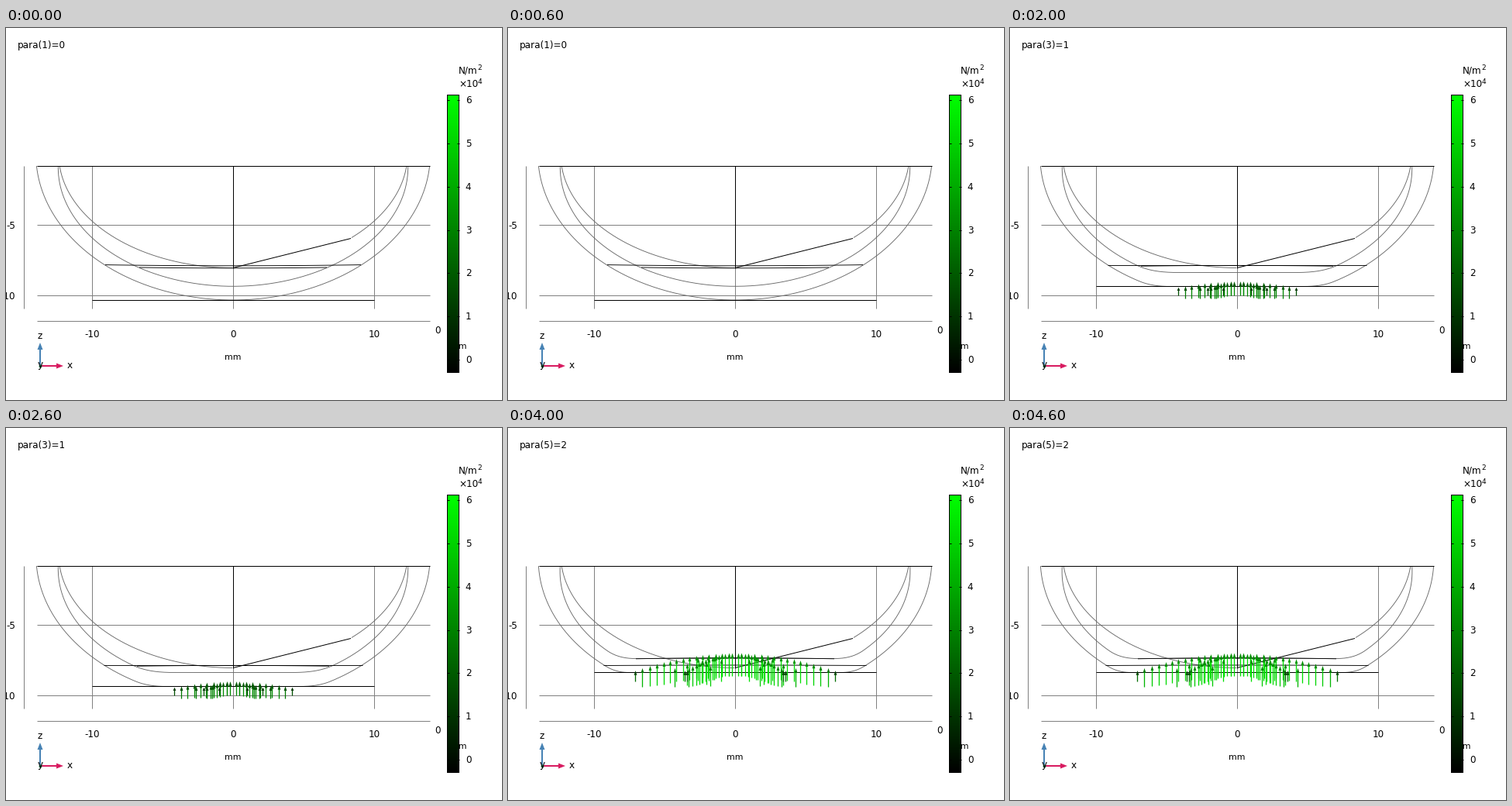
A matplotlib script that plays this animation: 640 by 480 pixels, repeating every 5 s.

```python
import numpy as np
import matplotlib.pyplot as plt
from matplotlib.animation import FuncAnimation
from matplotlib.collections import LineCollection, PolyCollection

W, H, DPI = 640, 480, 100
PX = 72 / DPI
CX, TOP = 293, 178
GREY, DARK = "#808080", "#686868"

plt.rcParams["font.family"] = "DejaVu Sans"
fig = plt.figure(figsize=(W / DPI, H / DPI), dpi=DPI, facecolor="white")
ax = fig.add_axes([0, 0, 1, 1])


def line(xs, ys, color=GREY, width=1, z=2):
    return ax.plot(xs, ys, color=color, lw=width * PX, zorder=z,
                   solid_capstyle="butt")[0]


def label(x, y, s, size=12, ha="center", z=6):
    return ax.text(x, y, s, fontsize=size * PX, ha=ha, va="baseline",
                   color="black", zorder=z)


# One value per load step
STEPS = [0, 0.5, 1, 1.5, 2]
PLATE = [351, 342, 333, 324, 315]
OUTER_FLAT = [0, 48, 85, 110, 133]
INNER_LEVEL = [333, 324, 315.5, 306.5, 297.5]
INNER_FLAT = [0, 48, 75, 105, 125]
BULGE = [0, 0.004, 0.011, 0.02, 0.034]
UPPER = [(165, 305.6, 306.8), (165.5, 306, 306.8), (167, 306.4, 306.4),
         (168, 306.5, 306.5), (169.5, 306.5, 306)]
LOWER = [(121, 309, 309.8), (122, 308.8, 309), (124, 307.2, 306.4),
         (125, 304.7, 302.2), (128, 297.8, 296.6)]
# contact radius, centre tip height, tip drop at the rim, centre length
ARROWS = [None, (46, 344.5, 3, 16), (77, 327, 8, 18),
          (110.5, 308, 15, 20), (130.5, 290.5, 23, 29)]


def shell(a, b, cy, level, flat, bulge):
    """Lower part of an ellipse pressed smoothly against a level."""
    s0 = (TOP - cy) / b
    t0 = np.arcsin(s0)
    t = np.linspace(t0, np.pi - t0, 400)
    x = a * np.cos(t) * (1 + bulge * (np.sin(t) - s0))
    y = cy + b * np.sin(t)
    if flat:
        k = cy + b * np.sqrt(1 - (flat / a) ** 2) - level
        h = np.clip(k - abs(y - level), 0, None)
        y = np.minimum(y, level) - h ** 2 / (4 * k)
    return CX + x, y


def bow(half, end, mid):
    u = np.linspace(-1, 1, 60)
    return CX + half * u, mid + (end - mid) * u ** 2


def arrow_field(spec):
    """Pressure arrows on concentric rings, seen from the side."""
    shafts, heads, colors = [], [], []
    if spec is None:
        return shafts, heads, colors
    rng = np.random.default_rng(4)
    c, tip0, drop, size = spec
    for n in range(1, 17):
        r = 8.4 * n + 1.1 * max(n - 12, 0)
        if r >= c:
            break
        q = (r / c) ** 2
        length = size * (1 + 0.35 * q) * (1 - q) ** 0.25
        tip = tip0 + drop * q
        green = min(0.9, 0.03 * length)
        spread = [1, 0.5] + ([rng.uniform(0.2, 0.72)] if n > 5 else [])
        for x in [CX + s * f * r for f in spread for s in (-1, 1)]:
            hw, hl = 1.9, min(6, 0.4 * length)
            shafts.append([(x, tip + hl / 2), (x, tip + length)])
            x = np.floor(x + 0.5) + 0.5
            heads.append([(x, tip), (x - hw, tip + hl), (x + hw, tip + hl)])
            colors.append((0, green, 0))
    return shafts, heads, colors


# Grid and frame
for y in (254, 345):
    line([39.5, 546.5], [y, y])
for x in (111, CX, 475):
    line([x, x], [TOP, 362])
line([23, 23], [TOP, 362])
line([39.5, 546.5], [378, 378])

# Fixed body edges
line([39.5, 546.5], [TOP, TOP], "black", 1, 4)
line([CX, CX], [TOP, 309.5], "black", 1, 4)
t0 = np.arcsin(15 / 146.5)
ts = np.linspace(t0, np.pi - t0, 400)
ix, iy = CX + 225 * np.cos(ts), 163 + 146.5 * np.sin(ts)
for part in (ix <= CX, ix >= 445):
    line(ix[part], iy[part], DARK, 0.9)
line([CX, 445], [309.5, 271.5], "black", 1, 4)

# Axis labels
label(12, 259, "-5", ha="right")
label(12, 350, "-10", ha="right")
for x, s in ((111, "-10"), (CX, "0"), (475, "10")):
    label(x, 399, s)
label(557, 394, "0")
label(CX, 428, "mm", 11)
label(584, 414, "mm", 11, z=1)

# Colour bar
ramp = np.zeros((256, 1, 3))
ramp[:, 0, 1] = np.linspace(1, 0, 256)
ax.imshow(ramp, extent=(569, 585, 445, 86), aspect="auto", zorder=5)
line([569, 584, 584, 569, 569], [86, 86, 444, 444, 86], "black", 1, 6)
for v in range(7):
    y = 428 - 55.8 * v
    line([569, 572], [y, y], "black", 1, 6)
    line([582, 585], [y, y], "black", 1, 6)
    label(596.5, y + 4, str(v))
label(584, 59, "N/m", ha="left")
label(608.7, 54, "2", 9, "left")
label(584, 76, "×10", ha="left")
label(608.9, 72, "4", 9, "left")

# Axis triad
BLUE, PINK = "#4682b4", "#d81b60"
line([44, 44], [436, 414], BLUE, 2, 4)
line([44, 66], [436, 436], PINK, 2, 4)
ax.fill([44, 40.5, 47.5], [406, 415, 415], color=BLUE, lw=0, zorder=4)
ax.fill([74, 65, 65], [436, 432.5, 439.5], color=PINK, lw=0, zorder=4)
ax.plot([44], [436], "o", ms=4 * PX, mec="#2e8b57", mfc="#2e8b57",
        mew=0, zorder=5)
label(44, 438, "y")
label(82.5, 439, "x")
label(44, 401, "z")

# Moving parts
title = label(15, 26, "", ha="left")
outer = line([], [], DARK, 0.9)
middle = line([], [], DARK, 0.9)
plate = line([], [], "black", 1, 4)
upper = line([], [], "black", 0.9, 4)
lower = line([], [], "black", 0.9, 4)
shafts = ax.add_collection(LineCollection([], linewidths=1.3 * PX, zorder=5))
heads = ax.add_collection(PolyCollection([], linewidths=0, zorder=5))

ax.set_xlim(0, W)
ax.set_ylim(H, 0)
ax.axis("off")


def update(i):
    title.set_text(f"para({i + 1})={STEPS[i]}")
    outer.set_data(*shell(254.4, 188, 163, PLATE[i] + 0.5, OUTER_FLAT[i],
                          BULGE[i]))
    middle.set_data(*shell(225.7, 153.3, 180, INNER_LEVEL[i], INNER_FLAT[i],
                           BULGE[i]))
    plate.set_data([111, 475], [PLATE[i]] * 2)
    upper.set_data(*bow(*UPPER[i]))
    lower.set_data(*bow(*LOWER[i]))
    segs, tris, colors = arrow_field(ARROWS[i])
    shafts.set_segments(segs)
    shafts.set_color(colors)
    heads.set_verts(tris)
    heads.set_facecolor([(0, 0.65 * g, 0) for _, g, _ in colors])
    return title, outer, middle, plate, upper, lower, shafts, heads


anim = FuncAnimation(fig, update, frames=len(STEPS), interval=1000,
                     init_func=lambda: update(0), repeat=True, repeat_delay=0)
plt.show()
```
